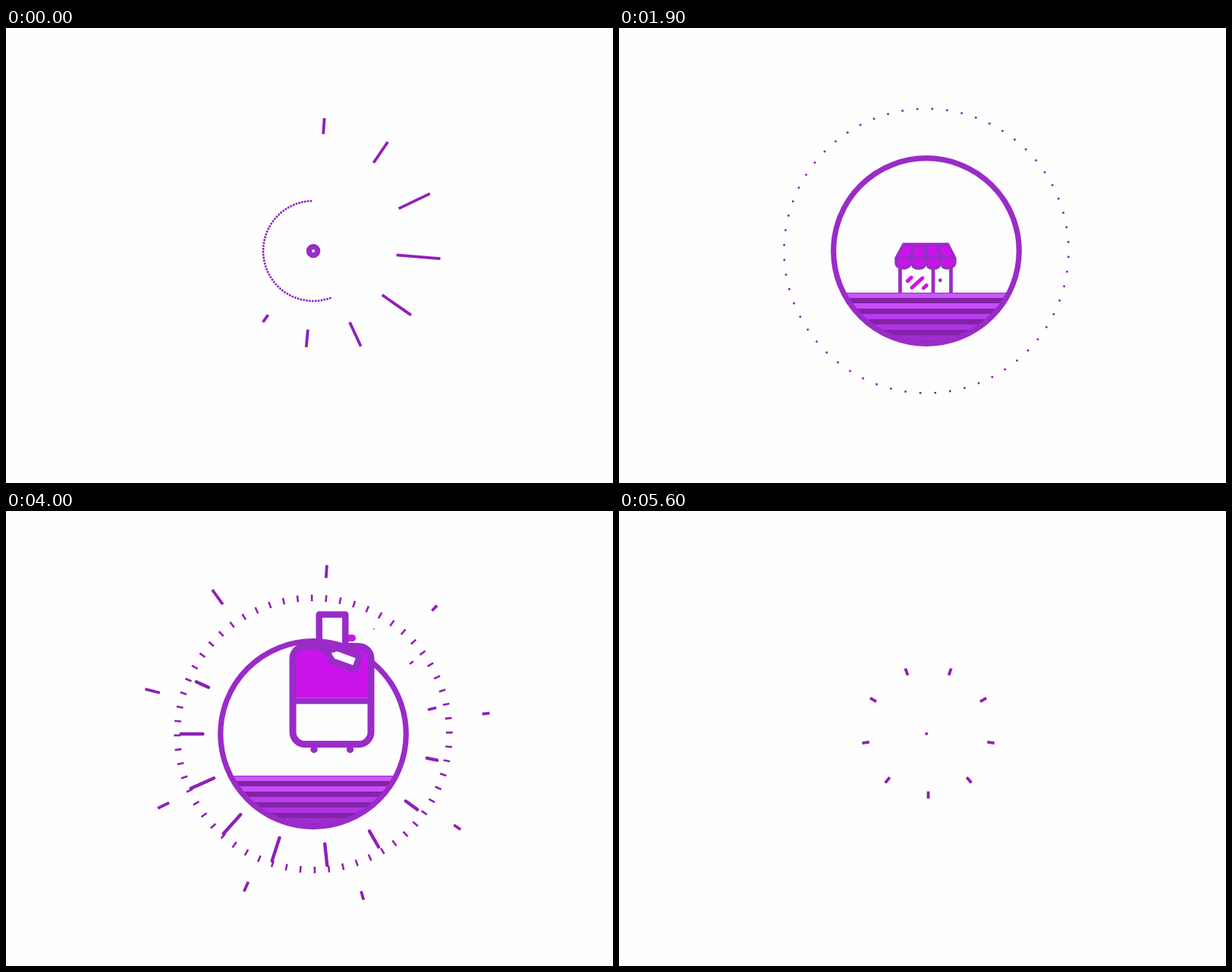
Write an HTML page that moves like this. It is 800 by 600 pixels and loops after 5.7 s.

```html
<!DOCTYPE html>
<html lang="en">
<head>
<meta charset="utf-8">
<title>Travel icons</title>
<style>
  html, body { margin: 0; width: 100%; height: 100%; overflow: hidden; background: #fefefe; }
  svg { display: block; width: 100vw; height: 100vh; }
  .line { fill: none; stroke: #9a2bc8; }
  .shell { fill: #fefefe; stroke: #9a2bc8; }
  .solid { fill: #9a2bc8; }
  .bright { fill: #cd13ec; }
  .hole { fill: #fefefe; }
  .burst { fill: none; stroke: #8f1fb8; }
  .round { stroke-linecap: round; stroke-linejoin: round; }
</style>
</head>
<body>
<svg viewBox="0 0 800 600">
  <defs>
    <clipPath id="disc"><circle id="discClip" cx="405" cy="294"/></clipPath>
    <clipPath id="glass"><rect x="350" y="223" width="107" height="49"/></clipPath>
    <clipPath id="caseClip"><rect x="366.5" y="202.5" width="103" height="129" rx="16"/></clipPath>
  </defs>

  <path id="oldDots" class="burst"/>
  <path id="ring" class="burst" stroke-width="2.6"/>
  <path id="rays" class="burst" stroke-width="3.8"/>
  <path id="opening" class="burst" stroke-width="3.8"/>
  <g id="sparks" class="burst round"></g>

  <g id="scene">
    <g clip-path="url(#disc)"><g id="ground"></g></g>
    <circle id="hoop" class="line" cx="405" cy="294" stroke-width="7.2"/>

    <g id="bus">
      <g class="shell" stroke-width="9.5">
        <rect x="350.5" y="315" width="19" height="29.5" rx="4"/>
        <rect x="436.5" y="315" width="19" height="29.5" rx="4"/>
      </g>
      <path id="busBody" fill="#cd13ec" stroke="#9a2bc8" stroke-width="10"/>
      <rect class="solid" x="346" y="219" width="115" height="57" rx="6"/>
      <rect id="pane" class="hole" x="355" width="97"/>
      <g id="wipers" class="line round" stroke-width="9" clip-path="url(#glass)">
        <path id="wiperA" d="M377 252L400 272"/>
        <path id="wiperB" d="M424 252L446 272"/>
      </g>
      <g class="solid"><circle cx="360" cy="298" r="14"/><circle cx="448" cy="298" r="14"/></g>
      <g class="hole"><circle cx="360" cy="298" r="5"/><circle cx="448" cy="298" r="5"/></g>
    </g>

    <g id="shop">
      <path class="line" stroke-width="10.5" d="M329 270V349M426.5 270V349M479 270V349"/>
      <path id="awning" class="solid"/>
      <path id="panels" class="bright"/>
      <circle class="solid" cx="447.3" cy="312.5" r="5.5"/>
      <path class="round" fill="none" stroke="#cd13ec" stroke-width="11"
        d="M351 314.5L362 304.5M364 334L395 306M398 335.5L407 327.5"/>
    </g>

    <g id="luggage">
      <rect id="pill" class="bright" y="187" width="13" height="9" rx="4.5"/>
      <path class="line" stroke-width="8.5" stroke-linejoin="round" d="M401.2 205V160.5H435.8V205"/>
      <g id="wheels"></g>
      <rect class="hole" x="366.5" y="202.5" width="103" height="129" rx="16"/>
      <g clip-path="url(#caseClip)">
        <rect id="fabric" class="bright" x="366" y="202" width="104"/>
        <rect id="band" class="solid" x="366" width="104" height="8"/>
      </g>
      <rect class="line" x="366.5" y="202.5" width="103" height="129" rx="16" stroke-width="9"/>
      <g id="tag">
        <path class="line" stroke-width="7" d="M0 -4V14"/>
        <path class="shell" stroke-width="9" stroke-linejoin="round" d="M0 9L9.5 21V53H-9.5V21Z"/>
      </g>
    </g>
  </g>
  <circle id="seed" cx="405.3" cy="293.7" r="2" fill="#8f1fb8"/>
</svg>

<script>
const LOOP = 5700, STEP = 100;
const DELAY = 50;   // time between neighbouring rays
const HUB = [405, 294], RAY_HUB = [407.6, 290.8];

const $ = id => document.getElementById(id);
const set = (id, attrs) => {
  for (const name in attrs) $(id).setAttribute(name, attrs[name]);
};
const mix = (a, b, u) => a + (b - a) * u;
const ramp = (t, from, to) => Math.min(1, Math.max(0, (t - from) / (to - from)));
const easeIn = (u, power = 2) => u ** power;
const easeOut = (u, power = 2) => 1 - (1 - u) ** power;
const backOut = u => 1 + 2.7 * (u - 1) ** 3 + 1.7 * (u - 1) ** 2;
const turn = t => t / 100;   // degrees of steady rotation

function spoke([cx, cy], degrees, inner, outer) {
  const a = degrees * Math.PI / 180, c = Math.cos(a), s = Math.sin(a);
  const at = r => `${(cx + r * c).toFixed(2)} ${(cy + r * s).toFixed(2)}`;
  return `M${at(inner)}L${at(outer)}`;
}

const scaleAbout = (x, y, sx, sy = sx) =>
  `translate(${x} ${y}) scale(${sx} ${sy}) translate(${-x} ${-y})`;

function show(id, on) {
  set(id, { visibility: on ? 'visible' : 'hidden' });
  return on;
}

function buildGround() {
  const colors = ['#cc57fc', '#c74dfb', '#b83df0', '#b032e6', '#9f2ccf'];
  const strip = (id, height, fill) =>
    `<rect id="${id}" x="270" width="270" height="${height}" fill="${fill}"/>`;
  $('ground').innerHTML = strip('soil', 120, '#8323a6') +
    colors.map((color, i) => strip('stripe' + i, 7, color)).join('') + strip('edge', 1, '#9a2bc8');
}

function buildWheels() {
  $('wheels').innerHTML = [394.5, 442].map(x =>
    `<circle class="solid wheel" cx="${x}" cy="338.5"/><circle class="hole hub" cx="${x}" cy="338.5"/>`).join('');
}

function buildAwning() {
  const width = 43.5, first = 340.2;
  let outline = 'M339 202H470Q473 202 474 205L495 246V262', panels = '';
  for (let i = 3; i >= 0; i--) {
    const left = i ? first + (i - .5) * width : 313;
    outline += `C${left + width - 1} 286 ${left + 1} 286 ${left} ${i ? 268 : 262}`;
    const mid = first + i * width, top = 404 + (i - 1.5) * 35.5;
    panels += `M${top - 12} 212H${top + 12}L${mid + 15.5} 242H${mid - 15.5}Z` +
      `M${mid - 18} 251H${mid + 18}C${mid + 20} 279 ${mid - 20} 279 ${mid - 18} 251Z`;
  }
  set('awning', { d: outline + 'V246L335 205Q336 202 339 202Z' });
  set('panels', { d: panels });
}

// Nine outer rays shoot out one after another, rest, then slip away
function drawRays(t) {
  const births = [425, 1950, 3550];
  const pull = 44 * easeIn(Math.max(0, t - 5150) / 250);
  let d = '';
  births.forEach((birth, wave) => {
    for (let k = 0; k < 9; k++) {
      const age = t - birth - k * DELAY;
      const left = wave < 2 ? births[wave + 1] - 740 + k * DELAY - t : LOOP;
      if (age <= 0 || left <= 0) continue;
      const gentle = wave === 0;
      const leave = ramp(-left, -300, 0);
      const inner = mix(gentle ? 208 : 198, 221.5, easeOut(ramp(age, 0, gentle ? 625 : 450)));
      const outer = gentle ? mix(207, 230.5, easeOut(ramp(age, 0, 370))) : mix(198, 231, ramp(age, 0, 75));
      d += spoke(RAY_HUB, -86 + turn(t) + k * 40, mix(inner, 237, leave) - pull, mix(outer, 237, leave) - pull);
    }
  });
  set('rays', { d });
}

function drawOpening(t) {
  let d = '';
  for (let k = 0; k < 12; k++) {
    const age = t / DELAY + 7 - k, late = Math.max(0, age - 4);
    const inner = 107.3 + 14.7 * late;
    const outer = 119 + 11.6 * Math.min(age, 4) + 2.3 * late;
    if (age > -1 && inner < outer) d += spoke(RAY_HUB, -86 + turn(t) + k * 30.2, inner, outer);
  }
  set('opening', { d });
}

const SPARKS = 15, SPARK_LIFE = 585;
function drawSparks(t) {
  [...$('sparks').children].forEach((path, k) => {
    const u = ramp(t - 3370 - k * DELAY, 0, SPARK_LIFE);
    const half = 17 * Math.sin(Math.PI * u ** .55) ** 1.2;
    const alive = u > 0 && u < 1;
    path.setAttribute('d', alive ? spoke(HUB, -124 + turn(t) + k * 24, 160 - half, 160 + half) : '');
    path.setAttribute('stroke-width', mix(4.4, 1.5, ramp(u, .75, 1)));
  });
}

// Dots on a ring; each pulse swaps them for ticks that shrink back to dots
function drawRing(t) {
  const radius = mix(66, 187.5, easeOut(ramp(t, 0, 600))) * (1 - easeIn(ramp(t, 5150, 5550)));
  const span = mix(200, 360, ramp(t, 0, 300));
  const gap = mix(3.4, 6, ramp(t, 0, 500));
  const age = t - (t < 3850 ? 2270 : 3850);
  const pulsing = age >= 0;
  const inner = pulsing ? -1.3 - 20 * (1 - easeOut(ramp(age, 0, 600))) : -1.3;
  const outer = pulsing ? 1.3 - 13 * (1 - easeOut(ramp(age, 0, 400))) : 1.3;
  const flying = pulsing && age < 140;
  const size = 2.6 * (1 - age / 200), far = 187.5 + age * .035;
  let d = '', old = '';
  for (let a = 0; radius > 0 && a < span - .1; a += gap) {
    const angle = -92.6 - turn(t) - a;
    d += spoke(HUB, angle, radius + inner, radius + outer);
    if (flying) old += spoke(HUB, angle, far - size / 2, far + size / 2);
  }
  set('ring', { d });
  set('oldDots', { d: old, 'stroke-width': flying ? size : 0 });
}

function drawHoop(t) {
  const r = mix(5.7, 122.3, easeOut(ramp(t, 0, 800), 3));
  set('hoop', { r });
  set('discClip', { r });
  const lift = easeIn(Math.max(0, 1000 - t) / 300);
  set('soil', { y: 349 + 9 * lift });
  set('edge', { y: 349 + 9 * lift });
  for (let i = 0; i < 5; i++) set('stripe' + i, { y: 349 + 14 * i + 18.5 * (i + 1) * lift });
  const scale = 1 - easeIn(ramp(t, 5050, 5550));
  set('scene', { transform: scaleAbout(...HUB, scale) });
  show('seed', scale === 0);
  $('scene').style.display = scale ? '' : 'none';
}

function drawBus(t) {
  if (!show('bus', t > 200 && t < 1900)) return;
  const hop = -34 * Math.sin(Math.PI * ramp(t, 400, 1000));
  const size = easeOut(ramp(t, 200, 500)) * (1 - easeIn(ramp(t, 1700, 1900)));
  set('bus', { transform: `translate(0 ${hop}) ${scaleAbout(403, t > 1500 ? 349 : 294, size)}` });

  const open = ramp(t, 700, 900);
  const wobble = open * (.6 + .4 * Math.cos((t - 1500) / 64));
  const side = 175 + 5 * wobble, brow = 172 + 6.5 * wobble, top = 170 + 3 * wobble;
  set('busBody', {
    d: `M332 199C332 185 350 ${side} 376 ${brow}Q390 ${top} 403 ${top}Q416 ${top} 430 ${brow}` +
      `C456 ${side} 474 185 474 199V308Q474 326 456 326H350Q332 326 332 308Z`
  });
  set('pane', { y: 247.5 - 19.5 * open, height: 39 * open });
  const sweep = 40 * Math.sin((t - 1500) / 100);
  set('wipers', { opacity: open === 1 ? 1 : 0 });
  set('wiperA', { transform: `rotate(${sweep} 400 272)` });
  set('wiperB', { transform: `rotate(${sweep} 446 272)` });
}

function drawShop(t) {
  if (!show('shop', t > 1850 && t < 3600)) return;
  const grow = backOut(ramp(t, 1850, 2300)) * (1 - easeIn(ramp(t, 3350, 3600)));
  set('shop', { transform: scaleAbout(404, 349, Math.min(1, grow), grow) });
}

function drawLuggage(t) {
  if (!show('luggage', t > 3550)) return;
  const land = ramp(t, 4000, 4300);
  const x = 11.5 * (1 - land);
  const y = mix(30, -24, easeOut(ramp(t, 3600, 4000))) * (1 - easeIn(land));
  const size = easeOut(ramp(t, 3550, 3850));
  set('luggage', { transform: `translate(${x} ${y}) ${scaleAbout(418, 267, size)}` });

  const fill = mix(270.5, 302, land);
  set('fabric', { height: fill - 202 });
  set('band', { y: fill });
  set('pill', { x: mix(436.5, 444, land) });
  document.querySelectorAll('.wheel').forEach(c => c.setAttribute('r', mix(4.7, 10.5, land)));
  document.querySelectorAll('.hub').forEach(c => c.setAttribute('r', 2.2 * land));

  const since = Math.max(0, t - 4000);
  const swing = -70 * ramp(t, 3600, 4000) * Math.exp(-since / 440) * Math.cos(2 * Math.PI * since / 600);
  set('tag', { transform: `translate(402 206) rotate(${swing})` });
}

buildGround();
buildWheels();
buildAwning();
$('sparks').innerHTML = '<path/>'.repeat(SPARKS);

const layers = [drawHoop, drawRing, drawRays, drawOpening, drawSparks, drawBus, drawShop, drawLuggage];
const origin = performance.now();
function frame() {
  const elapsed = (performance.now() - origin) % LOOP;
  const t = Math.floor(elapsed / STEP) * STEP;
  layers.forEach(draw => draw(t));
  requestAnimationFrame(frame);
}
frame();
</script>
</body>
</html>
```
